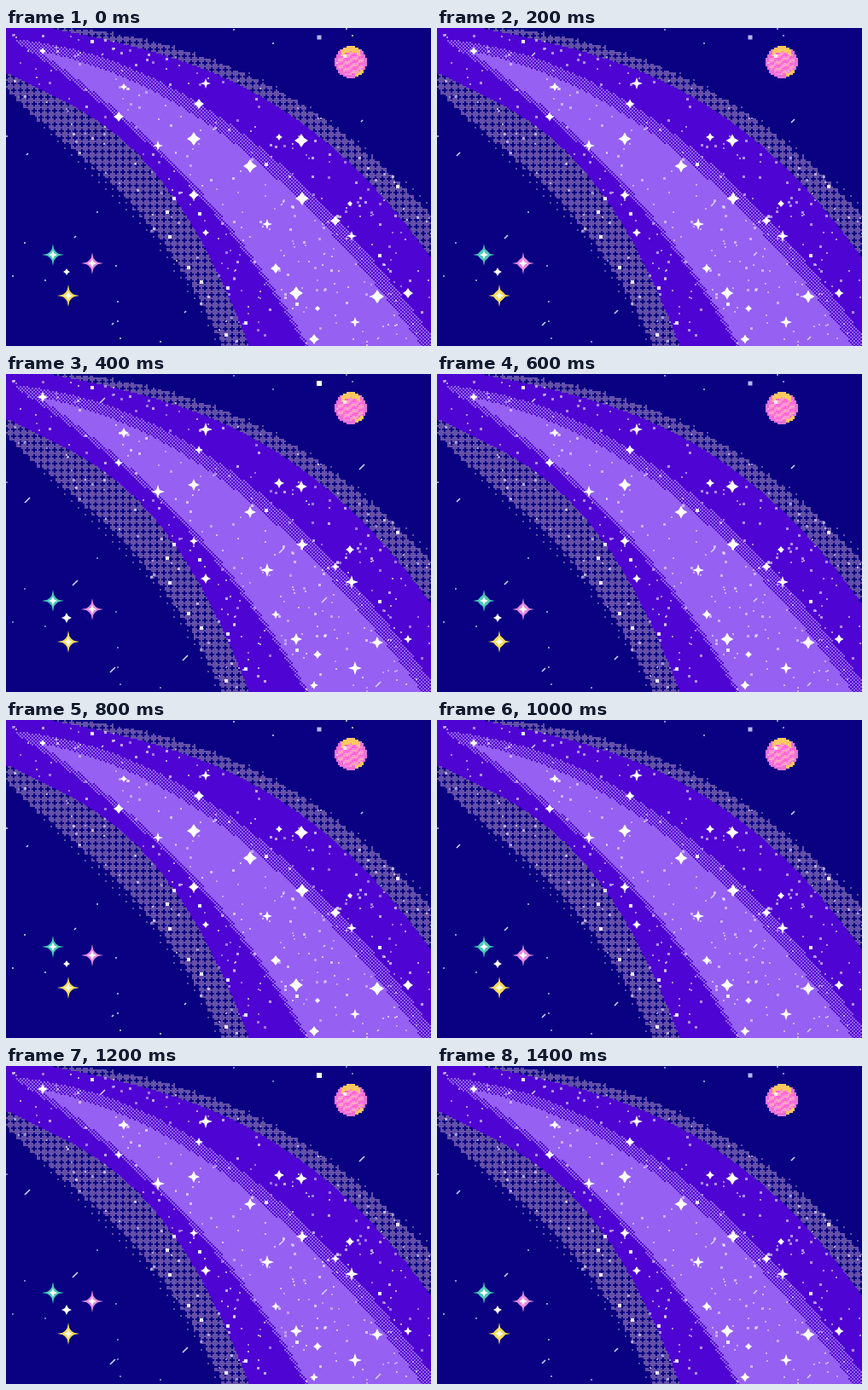
Animation, 498 px wide and 373 px high, one loop 1600 ms. Source, as an HTML page with a canvas:

```html
<!DOCTYPE html>
<html lang="en">
<head>
<meta charset="utf-8">
<title>Pixel galaxy</title>
<style>
html, body { margin: 0; width: 100%; height: 100%; overflow: hidden; background: #0a0082; }
canvas { display: block; }
</style>
</head>
<body>
<canvas id="sky" width="498" height="373"></canvas>
<script>
const W = 498, H = 373, CELL = 2;
const canvas = document.getElementById('sky');
const ctx = canvas.getContext('2d');
const backdrop = document.createElement('canvas');
backdrop.width = W;
backdrop.height = H;

const NAVY = '#0a0082', HAZE = '#6450a8', VIOLET = '#4e04d2', LILAC = '#9660f2', WHITE = '#fff';

// The cubic curve through four key points.
function cubic(...points) {
  return x => points.reduce((sum, [px, py]) => sum + points.reduce(
    (term, [qx]) => qx === px ? term : term * (x - qx) / (px - qx), py), 0);
}

const edges = {
  hazeTop: cubic([75, -2], [200, 20], [345, 84], [498, 210]),
  violetTop: cubic([75, 4], [200, 36], [345, 110], [498, 270]),
  lilacTop: cubic([8, 12], [130, 40], [300, 141], [498, 360]),
  lilacBottom: cubic([8, 13], [100, 80], [215, 185], [350, 373]),
  violetBottom: cubic([0, 52], [100, 104], [190, 190], [284, 373]),
  hazeBottom: cubic([0, 75], [75, 150], [175, 255], [247, 375])
};

function randomFrom(seed) {
  return () => (seed = (seed * 16807) % 2147483647) / 2147483647;
}

function box(c, x, y, w, h, color) {
  c.fillStyle = color;
  c.fillRect(x, y, w, h);
}

// Round dark spots every 8 px, with a checkerboard in between.
function halftone(x, y) {
  const wave = v => Math.cos(v * Math.PI / 4);
  const checker = (x + y) / CELL % 2;
  return .5 + .18 * (wave(x) + wave(y)) + .12 * (checker - .5);
}

function cellColor(x, y, e) {
  const haze = t => halftone(x, y) < Math.min(.66, .2 + 1.2 * t) ? HAZE : NAVY;
  if (y < e.hazeTop || y > e.hazeBottom) return NAVY;
  if (y < e.violetTop) return haze((y - e.hazeTop) / (e.violetTop - e.hazeTop));
  if (y > e.violetBottom) return haze((e.hazeBottom - y) / (e.hazeBottom - e.violetBottom));
  const depth = Math.min((y - e.lilacTop) / (9 + x * .04), (e.lilacBottom - y) / 8, x < 40 ? .6 : 1);
  if (x < 8 || depth < 0) return VIOLET;
  return depth >= 1 || (x + y) / CELL % 2 ? LILAC : VIOLET;
}

function paintPlanet(c) {
  const cx = 403, cy = 39, r = 18.5;
  for (let dy = -18; dy <= 18; dy += CELL) {
    for (let dx = -18; dx <= 18; dx += CELL) {
      const d = Math.hypot(dx, dy);
      if (d > r) continue;
      const stripe = Math.sin((dy + dx * .6) * .8 + Math.sin(dx * .7));
      let color = stripe > .5 ? '#ff66d0' : stripe > -.6 ? '#ff84e2' : '#ffa6c0';
      if (d > 15.5) color = '#e872d8';
      if (d > 12 && Math.abs(dx) < 12 && dy < 0 || d > 15 && dx > 4 && dy > 8) color = '#ffc860';
      if (Math.hypot(dx + 7, dy + 7) < 3) color = '#ffe6f8';
      box(c, cx + dx, cy + dy, CELL, CELL, color);
    }
  }
}

function paintBackdrop() {
  const c = backdrop.getContext('2d');
  for (let x = 0; x < W; x += CELL) {
    const e = {};
    for (const name in edges) e[name] = edges[name](x);
    for (let y = 0; y < H; y += CELL) box(c, x, y, CELL, CELL, cellColor(x, y, e));
  }
  paintPlanet(c);
}

// Dust is dense in the nebula and sparse in the open sky.
const rnd = randomFrom(71);
const dust = [];
for (let i = 0; i < 560; i++) {
  const x = Math.floor(rnd() * W), y = Math.floor(rnd() * H);
  const inside = y > edges.hazeTop(x) + 8 && y < edges.hazeBottom(x) - 8;
  const size = rnd() < .04 ? 4 : rnd() < .35 ? 3 : 2;
  if (inside || i % 12 === 0) dust.push({ x, y, size: inside ? size : 2, beat: i % 2 });
}

// Stars that shrink and stars that swell through the cycle: x, y, arm length.
const fading = [[220, 130, 8], [286, 162, 8], [346, 132, 8], [347, 200, 8], [435, 315, 8], [340, 311, 8],
  [132, 104, 6], [226, 89, 6], [220, 196, 6], [316, 282, 6], [386, 226, 6], [471, 311, 6], [361, 365, 6]];
const growing = [[234, 65, 7], [306, 230, 7], [178, 138, 7], [409, 345, 7], [405, 244, 7], [320, 128, 5],
  [138, 69, 5], [43, 27, 5], [234, 240, 5], [403, 206, 4], [365, 329, 4], [71, 286, 5]];
const streaks = [[323, 207], [373, 265], [113, 31], [417, 109], [81, 245], [25, 148], [210, 333], [125, 347], [436, 364]];
const gems = [[55, 266, '#48c9b8'], [101, 276, '#e58be0'], [73, 314, '#f5dc55']];

// A four-pointed star; waist is how far its sides reach out on the diagonals.
function sparkle(x, y, arm, waist, color = WHITE) {
  ctx.fillStyle = color;
  ctx.beginPath();
  for (let i = 0; i < 8; i++) {
    const angle = i * Math.PI / 4, reach = i % 2 ? waist : arm;
    ctx.lineTo(x + reach * Math.cos(angle), y + reach * Math.sin(angle));
  }
  ctx.fill();
}

function drawStreak(x, y, level) {
  ctx.strokeStyle = '#d6d2ff';
  ctx.lineWidth = 1.6;
  ctx.beginPath();
  const half = 1 + level;
  ctx.moveTo(x - half, y + half);
  ctx.lineTo(x + half, y - half);
  ctx.stroke();
}

function draw(level) {
  ctx.drawImage(backdrop, 0, 0);
  for (const d of dust) {
    ctx.globalAlpha = d.size === 4 ? 1 : d.beat ? .5 + .1 * level : .7 - .1 * level;
    box(ctx, d.x, d.y, d.size, d.size, '#efe6ff');
  }
  ctx.globalAlpha = 1;

  const side = level === 2 ? 6 : 5;
  box(ctx, 367 - side / 2, 11 - side / 2, side, side, level === 2 ? WHITE : '#b9b5e8');

  for (const [x, y] of streaks) drawStreak(x, y, level);
  for (const [x, y, arm] of fading) sparkle(x, y, arm - level * .5, arm * (.56 - level * .09));
  for (const [x, y, arm] of growing) sparkle(x, y, arm - 1 + level, 2.2 + level * .3);
  for (const [x, y, color] of gems) {
    sparkle(x, y, 13, 3, color);
    sparkle(x, y, 8, level === 1 ? 6 : 5, color);
    sparkle(x, y, 5, 2.2);
  }
}

const LEVELS = [0, 1, 2, 1];
function tick(now) {
  draw(LEVELS[Math.floor(now / 200) % LEVELS.length]);
  requestAnimationFrame(tick);
}

paintBackdrop();
draw(0);
requestAnimationFrame(tick);
</script>
</body>
</html>
```
